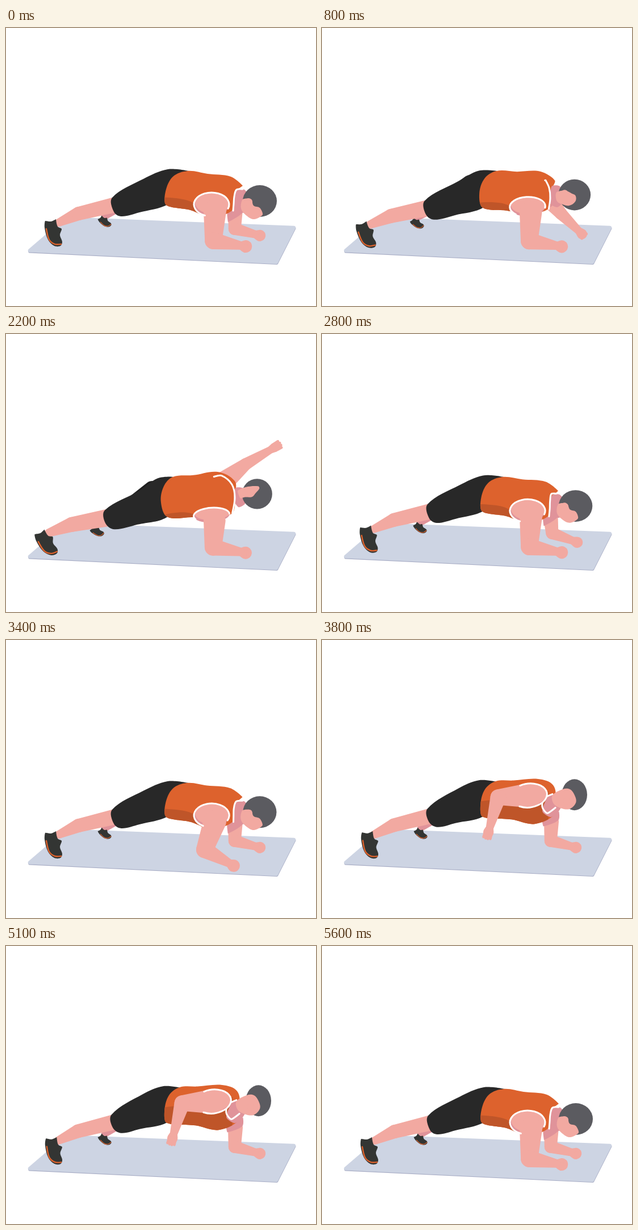
Recreate the animation shown at these times as an HTML page with a canvas. Size 546 by 490 pixels, loop 5.7 s.

```html
<!DOCTYPE html>
<html lang="en">
<head>
<meta charset="utf-8">
<title>Plank rotation</title>
<style>
html, body { margin: 0; width: 100%; height: 100%; overflow: hidden; background: #fff; }
canvas { display: block; width: 546px; height: 490px; }
</style>
</head>
<body>
<canvas id="stage"></canvas>
<script>
const W = 546, H = 490, LOOP = 5700, STEP = 100;
const SKIN = '#f2a9a1', SHADE = '#e0939a', BLACK = '#282828', SHOE = '#333533';
const ORANGE = '#dd622d', RUST = '#bf5529', HAIR = '#5b5b60';

// Three poses each: plank, open to the left, open to the right
const rig = {
  // Joints: x, y, radius
  ankle: ['93,343,7', '67,354,7.5', '91,343,7'],
  calf: ['128,327,12', '110,340,13.5', '126,326,12'],
  knee: ['190,312,13.5', '172,330,16', '188,310,13.5'],
  farHip: ['264,273,14', '255,275,16', '262,271,14'],
  farKnee: ['212,305,11', '205,312,12', '212,303,11'],
  farAnkle: ['174,332,6', '152,338,7', '174,331,6'],
  ear: ['427,307,7', '428,259,5', '433,268,5.5'],
  // Ellipses: x, y, radii, tilt, then the arc of the hem
  skull: ['447,305,30,28,0', '440,271,25,26,0', '443,250,17,27,0'],
  armhole: ['362,311,31,21,0,112,380', '362,323,32,9,-6,175,350', '366,248,33,21,-12,340,560'],
  // Shoes: x, y, turn, scale
  shoe: ['89,344,0,1', '62,354,-27,1', '91,344,3,1'],
  farShoe: ['171,333,-35,.5', '149,344,-50,.5', '171,333,-35,.5'],
  // Arms: shoulder x, y, radius, bone lengths, elbow and wrist radius, open hand
  nearArm: ['368,322,20,53,48,15,7.5,0', '367,332,19,44,48,15,7.5,0', '364,240,23,57,59,13,6.5,1'],
  farArm: ['404,320,13,34,36,11,7,0', '366,238,22,66,54,10.5,6.5,1', '404,320,13,34,36,11,7,0'],
  // Outlines
  shorts: [
    '187,299 242,266 285,249 322,252 300,290 285,311 235,325 203,332 190,324',
    '168,316 232,281 258,257 281,252 290,290 286,326 230,341 185,350 168,338',
    '185,296 240,258 270,246 296,248 292,290 283,311 235,321 203,328 187,318'],
  shirt: [
    '320,252 355,257 396,262 417,278 404,290 400,320 360,333 325,321 282,312 281,288 294,262',
    '281,252 318,245 362,234 396,250 404,276 398,314 360,316 328,324 285,327 269,300 270,272',
    '296,247 325,241 370,233 400,240 418,280 417,298 385,318 340,313 283,311 278,290 282,264'],
  shadow: [
    '270,299 320,304 356,326 340,345 270,335',
    '280,330 310,319 330,319 335,340 280,340',
    '270,281 336,262 430,225 430,335 270,335'],
  pit: [
    '391,318 418,311 416,326 391,342',
    '385,275 390,272 390,280 385,282',
    '387,312 417,296 416,312 389,319'],
  neck: [
    '405,286 420,285 430,305 420,325 401,322',
    '404,264 416,266 418,294 405,296 402,280',
    '398,263 420,270 415,288 392,303 379,288'],
  neckline: [
    '417,284 406,285 402,297 401,310 400,322',
    '342,236 368,233 396,250 404,278 398,313',
    '398,263 383,274 378,292 394,302 419,277'],
  face: [
    '417,302 432,302 436,313 447,317 452,329 437,337 424,331 414,318',
    '404,264 420,254 448,247 446,251 434,257 432,263 418,267 412,276',
    '398,254 420,235 437,228 443,242 444,256 436,270 422,273 404,268']
};

// Shoe outline and its stripe, measured from the ankle
const shoePts = parse('-20,-4 -10,-3 -1,-7 2,6 9,10 6,21 10,33 7,40 -4,40 -15,29 -21,8');
const stripePts = parse('-18,10 -13,29 -3,37 8,37');

// Arm swings: progress, upper arm angle, forearm angle
const farSwing = [[0, 92, 15], [.33, 48, 45], [1, -119, -100]];
const nearSwing = [[0, 93, 10], [.45, 176, 104], [.82, 241, 228], [1, 262, 262]];

function parse(s) {
  return s.split(' ').map(p => p.split(',').map(Number));
}
for (const name in rig) rig[name] = rig[name].map(parse);

const rad = deg => deg * Math.PI / 180;
const clamp = x => Math.min(1, Math.max(0, x));
const ease = x => (1 - Math.cos(Math.PI * clamp(x))) / 2;
const mix = (a, b, f) => a.map((v, i) => v + (b[i] - v) * f);
const step = ([x, y], deg, d) => [x + Math.cos(rad(deg)) * d, y + Math.sin(rad(deg)) * d];

function along(keys, p) {
  let i = 0;
  while (i < keys.length - 2 && p > keys[i + 1][0]) i++;
  const a = keys[i], b = keys[i + 1];
  return mix(a, b, clamp((p - a[0]) / (b[0] - a[0]))).slice(1);
}

const canvas = document.getElementById('stage');
const g = canvas.getContext('2d');
const ratio = window.devicePixelRatio || 1;
canvas.width = W * ratio;
canvas.height = H * ratio;
g.scale(ratio, ratio);
g.lineCap = g.lineJoin = 'round';

// Curve through points; handles shrink where the outline turns sharply
function trace(pts, open) {
  const n = pts.length;
  const at = i => pts[open ? Math.min(n - 1, Math.max(0, i)) : (i + n) % n];
  const unit = (p, q) => {
    const x = q[0] - p[0], y = q[1] - p[1], d = Math.hypot(x, y) || 1;
    return [x / d, y / d];
  };
  const tangent = i => {
    const a = unit(at(i - 1), at(i)), b = unit(at(i), at(i + 1));
    const k = clamp((a[0] * b[0] + a[1] * b[1]) * 1.5 + .3);
    return unit(at(i - 1), at(i + 1)).map(v => v * k);
  };
  g.beginPath();
  g.moveTo(...pts[0]);
  for (let i = 0; i < (open ? n - 1 : n); i++) {
    const p = at(i), q = at(i + 1), s = tangent(i), e = tangent(i + 1);
    const h = Math.hypot(q[0] - p[0], q[1] - p[1]) / 3;
    g.bezierCurveTo(p[0] + s[0] * h, p[1] + s[1] * h, q[0] - e[0] * h, q[1] - e[1] * h, q[0], q[1]);
  }
  if (!open) g.closePath();
}

function paint(color) {
  g.fillStyle = color;
  g.fill();
}

function stroke(color, width) {
  g.strokeStyle = color;
  g.lineWidth = width;
  g.stroke();
}

function fill(pts, color) {
  trace(pts);
  paint(color);
}

function oval([x, y, rx, ry, tilt], from = 0, to = 360) {
  g.beginPath();
  g.ellipse(x, y, rx, ry, rad(tilt), rad(from), rad(to));
}

// Two circles joined by their outer tangents
function taper([x1, y1, r1], [x2, y2, r2], color) {
  const a = Math.atan2(y2 - y1, x2 - x1), d = Math.hypot(x2 - x1, y2 - y1) || 1;
  const w = Math.acos(Math.max(-1, Math.min(1, (r1 - r2) / d)));
  g.beginPath();
  g.arc(x1, y1, r1, a + w, a - w + 2 * Math.PI);
  g.arc(x2, y2, r2, a - w, a + w);
  paint(color);
}

function limb(joints, color) {
  for (let i = 1; i < joints.length; i++) taper(joints[i - 1], joints[i], color);
}

function hand(wrist, deg, size, open) {
  const palm = step(wrist, deg, 10);
  taper([...wrist, 6], [...palm, size - 3 * open], SKIN);
  for (let i = -1.5; i <= 1.5; i++) {
    const base = step(palm, deg + 90, i * 3.4);
    const tip = step(base, deg + i * 4, (20 - Math.abs(i) * 2) * open);
    taper([...base, 3], [...tip, 2.4], SKIN);
  }
  taper([...palm, 3], [...step(palm, deg + 48, 12 * open), 2.2], SKIN);
}

function arm([x, y, r, upper, fore, elbowR, wristR, open], [upDeg, foreDeg], fist) {
  const elbow = step([x, y], upDeg, upper), wrist = step(elbow, foreDeg, fore);
  limb([[x, y, r], [...elbow, elbowR], [...wrist, wristR]], SKIN);
  hand(wrist, foreDeg, fist, open);
}

function shoe([x, y, deg, k]) {
  g.save();
  g.translate(x, y);
  g.rotate(rad(deg));
  g.scale(k, k);
  fill(shoePts, SHOE);
  trace(stripePts, true);
  stroke(ORANGE, 2.4);
  g.restore();
}

function mat(color, dx, dy) {
  const c = [[106, 333], [512, 349], [478, 416], [34, 395]];
  g.beginPath();
  g.moveTo(250 + dx, 338.7 + dy);
  for (let i = 1; i <= 4; i++) {
    const p = c[i % 4], q = c[(i + 1) % 4];
    g.arcTo(p[0] + dx, p[1] + dy, q[0] + dx, q[1] + dy, 3);
  }
  paint(color);
}

function draw(t) {
  // Each side opens, then runs the same path backwards
  const right = t >= 3200;
  const u = right ? (t < 4450 ? t : 8900 - t) : (t < 1650 ? t : 3300 - t);
  const f = right ? ease((u - 3300) / 900) : ease((u - 300) / 1300);
  const pts = name => rig[name][0].map((p, i) => mix(p, rig[name][right ? 2 : 1][i], f));
  const one = name => pts(name)[0];

  g.fillStyle = '#fff';
  g.fillRect(0, 0, W, H);
  mat('#a9aec6', .3, 1.2);
  mat('#cdd4e3', 0, 0);

  limb([one('farKnee'), one('farAnkle')], SHADE);
  shoe(one('farShoe'));
  taper(one('farHip'), one('farKnee'), '#1f1f1f');
  arm(one('farArm'), along(farSwing, right ? 0 : f), 10);
  fill(pts('pit'), SHADE);

  limb(['ankle', 'calf', 'knee'].map(one), SKIN);
  shoe(one('shoe'));
  fill(pts('shorts'), BLACK);

  fill(pts('shirt'), ORANGE);
  g.save();
  g.clip();
  fill(pts('shadow'), RUST);
  g.restore();

  fill(pts('neck'), SHADE);
  trace(pts('neckline'), true);
  stroke('#fff', 3);
  oval(one('skull'));
  paint(HAIR);
  fill(pts('face'), SKIN);
  const [ex, ey, er] = one('ear');
  oval([ex, ey, er, er, 0]);
  paint(SKIN);

  const hole = one('armhole');
  oval(hole);
  paint(SHADE);
  g.save();
  g.clip();
  oval([hole[0] + 2, hole[1] - 4, ...hole.slice(2)]);
  paint(SKIN);
  g.restore();
  arm(one('nearArm'), along(nearSwing, right ? (u - 3300) / 1100 : 0), 11);
  oval(hole, hole[5], hole[6]);
  stroke('#fff', 3);
}

function tick(now) {
  draw(Math.floor(now % LOOP / STEP) * STEP);
  requestAnimationFrame(tick);
}
draw(0);
requestAnimationFrame(tick);
</script>
</body>
</html>
```
